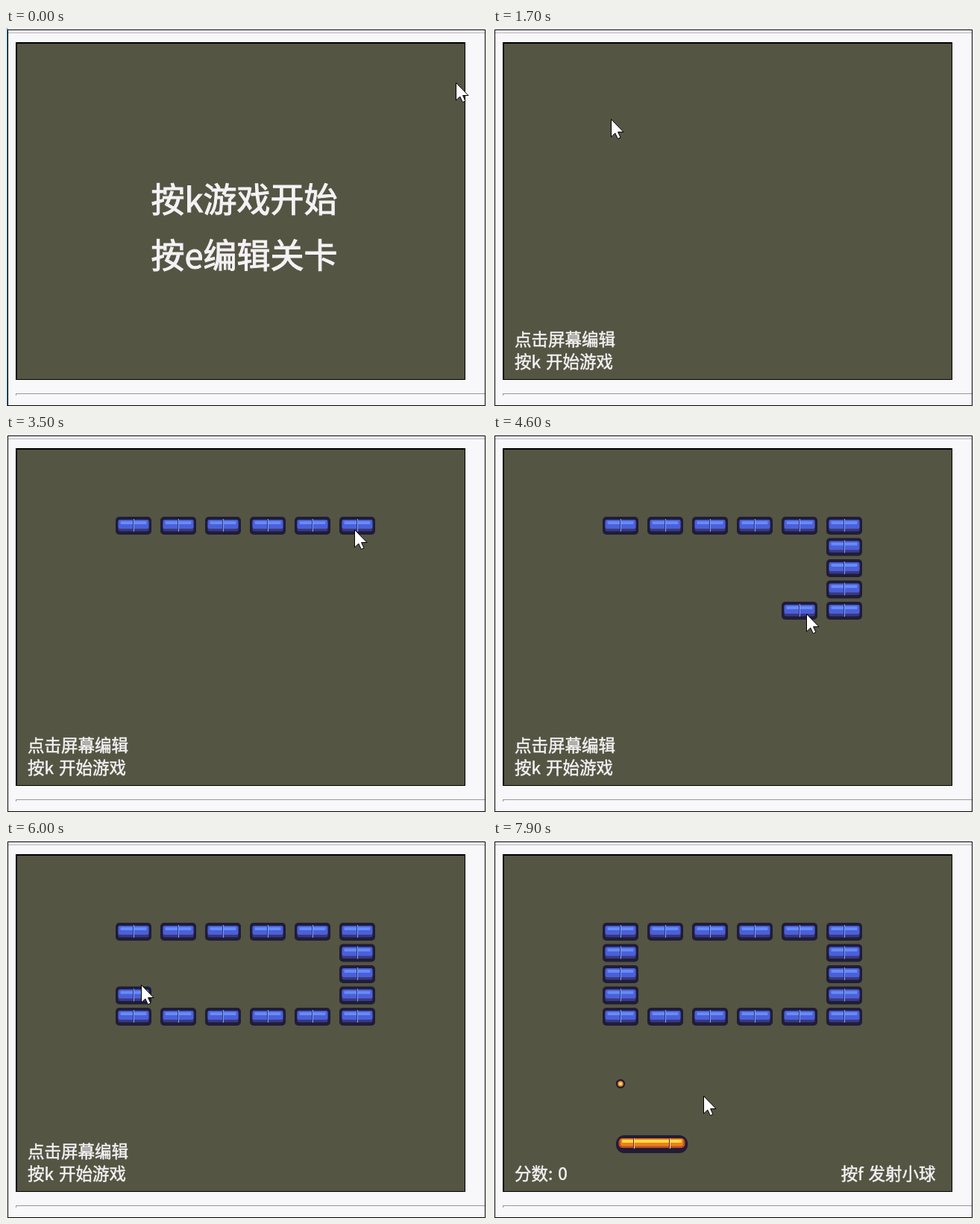
An HTML page for the animation above (8 s loop, 645x507 px).

```html
<!DOCTYPE html>
<html lang="zh-CN">
<head>
<meta charset="utf-8">
<title>打砖块</title>
<style>
  html, body { margin: 0; width: 100%; height: 100%; overflow: hidden; background: #f8f8fa; }
  svg { display: block; }
  text {
    font: 22.5px "Noto Sans CJK SC", "Noto Sans CJK", "Noto Sans", sans-serif;
    fill: #f5f1f4; stroke: #f5f1f4; stroke-width: .5; word-spacing: 2px; white-space: pre;
  }
  .big { font-size: 45px; stroke-width: 1.1; text-anchor: middle; }
</style>
</head>
<body>
<svg width="645" height="507" viewBox="0 0 645 507">
  <defs>
    <g id="brick">
      <rect width="48" height="24" rx="5" fill="#1f1c38"/>
      <rect x="3.5" y="4" width="41" height="15.5" rx="2.5" fill="#38397f"/>
      <rect x="3.5" y="4" width="41" height="12" rx="2.5" fill="#4c5fd9"/>
      <rect x="6.5" y="6" width="35" height="4" rx="1" fill="#658cf6"/>
      <rect x="23" y="3" width="1" height="17" fill="#2f347e"/>
      <rect x="24" y="3" width="1" height="17" fill="#7d9ff0"/>
    </g>
  </defs>

  <rect width="645" height="507" fill="#f8f8fa"/>
  <path d="M3 6.5H642" stroke="#b9b3bb"/>
  <path d="M2 2.5H643M2.5 2V507M642.5 2V507M2 506.5H643" stroke="#000"/>
  <path id="edge" d="M1.5 0V507" stroke="#3c7d98"/>
  <path d="M13 490.5H642M13.5 490V493" stroke="#99969b"/>
  <rect x="13" y="19" width="603" height="453" fill="#000"/>
  <rect x="15" y="21" width="600" height="450" fill="#545543"/>

  <g id="menu">
    <text class="big" x="319.5" y="247">按k游戏开始</text>
    <text class="big" x="319.5" y="322">按e编辑关卡</text>
  </g>
  <g id="bricks"></g>
  <g id="editor">
    <text x="29" y="426">点击屏幕编辑</text>
    <text x="29" y="456">按k 开始游戏</text>
  </g>
  <g id="game">
    <circle cx="171" cy="327" r="6.2" fill="#261b34"/>
    <circle cx="171" cy="327" r="3.8" fill="#e58a30"/>
    <circle cx="171" cy="327" r="2" fill="#ffe07a"/>
    <g transform="translate(165 396)">
      <rect width="96" height="24" rx="11" fill="#231b35"/>
      <rect x="3.5" y="4" width="89" height="13" rx="5" fill="#c2501f"/>
      <rect x="6" y="4.5" width="84" height="10" rx="3" fill="#ea8025"/>
      <rect x="8" y="6" width="80" height="4" rx="1" fill="#fbdc38"/>
      <path d="M23.5 4V18M71.5 4V18" stroke="#5a2830"/>
      <path d="M24.5 4V18M72.5 4V18" stroke="#ffd48a"/>
    </g>
    <text x="29" y="456">分数: 0</text>
    <text x="593.5" y="456" text-anchor="end">按f 发射小球</text>
  </g>
  <path id="cursor" d="M.5 .5V24L5.8 19L9.3 26.5L13 25L9.6 17.5H17Z" fill="#fff" stroke="#000"/>
</svg>
<script>
  const LOOP = 8000, STEP = 100;
  const EDIT_AT = 900, DRAG_FROM = 2100, DRAG_TO = 6400, PLAY_AT = 7900;
  const COLS = 6, ROWS = 5;

  // Turning points of the cursor tip, reached at time t.
  const path = [
    { t: 0, x: 603, y: 73 },
    { t: 400, x: 330, y: 190 },
    { t: 800, x: 330, y: 190 },
    { t: 1700, x: 158, y: 122 },
    { t: 1900, x: 136, y: 114 },
    { t: 2600, x: 293, y: 122 },
    { t: 2900, x: 398, y: 125 },
    { t: 3500, x: 467, y: 128 },
    { t: 4200, x: 465, y: 236 },
    { t: 4600, x: 420, y: 241 },
    { t: 5200, x: 267, y: 241 },
    { t: 5700, x: 178, y: 236 },
    { t: 6000, x: 181, y: 194 },
    { t: 6400, x: 174, y: 143 },
    { t: 7100, x: 282, y: 343 }
  ];

  const $ = id => document.getElementById(id);
  const show = (el, on) => el.setAttribute("visibility", on ? "visible" : "hidden");

  function tipAt(t) {
    const next = path.findIndex(point => point.t > t);
    if (next < 0) return path.at(-1);
    const a = path[next - 1], b = path[next];
    const k = (t - a.t) / (b.t - a.t);
    const mix = axis => Math.round(a[axis] + (b[axis] - a[axis]) * k);
    return { x: mix("x"), y: mix("y") };
  }

  // Dragging places a brick in every cell the tip enters.
  const bricks = new Map();
  for (let t = DRAG_FROM; t <= DRAG_TO; t += STEP) {
    const { x, y } = tipAt(t);
    const col = Math.min(COLS - 1, Math.floor((x - 141) / 60));
    const row = Math.min(ROWS - 1, Math.floor((y - 107) / 28.6));
    const key = row * COLS + col;
    if (bricks.has(key)) continue;
    const el = document.createElementNS("http://www.w3.org/2000/svg", "use");
    el.setAttribute("href", "#brick");
    el.setAttribute("x", 147 + 60 * col);
    el.setAttribute("y", 111 + 28.5 * row);
    $("bricks").append(el);
    bricks.set(key, { el, t });
  }

  function draw(time) {
    const t = Math.floor(time % LOOP / STEP) * STEP;
    const { x, y } = tipAt(t);
    show($("edge"), t < STEP);
    show($("menu"), t < EDIT_AT);
    show($("editor"), t >= EDIT_AT && t < PLAY_AT);
    show($("game"), t >= PLAY_AT);
    for (const brick of bricks.values()) show(brick.el, t >= brick.t);
    $("cursor").setAttribute("transform", `translate(${x} ${y})`);
  }

  const start = performance.now();
  function tick() {
    draw(performance.now() - start);
    requestAnimationFrame(tick);
  }
  tick();
</script>
</body>
</html>
```
